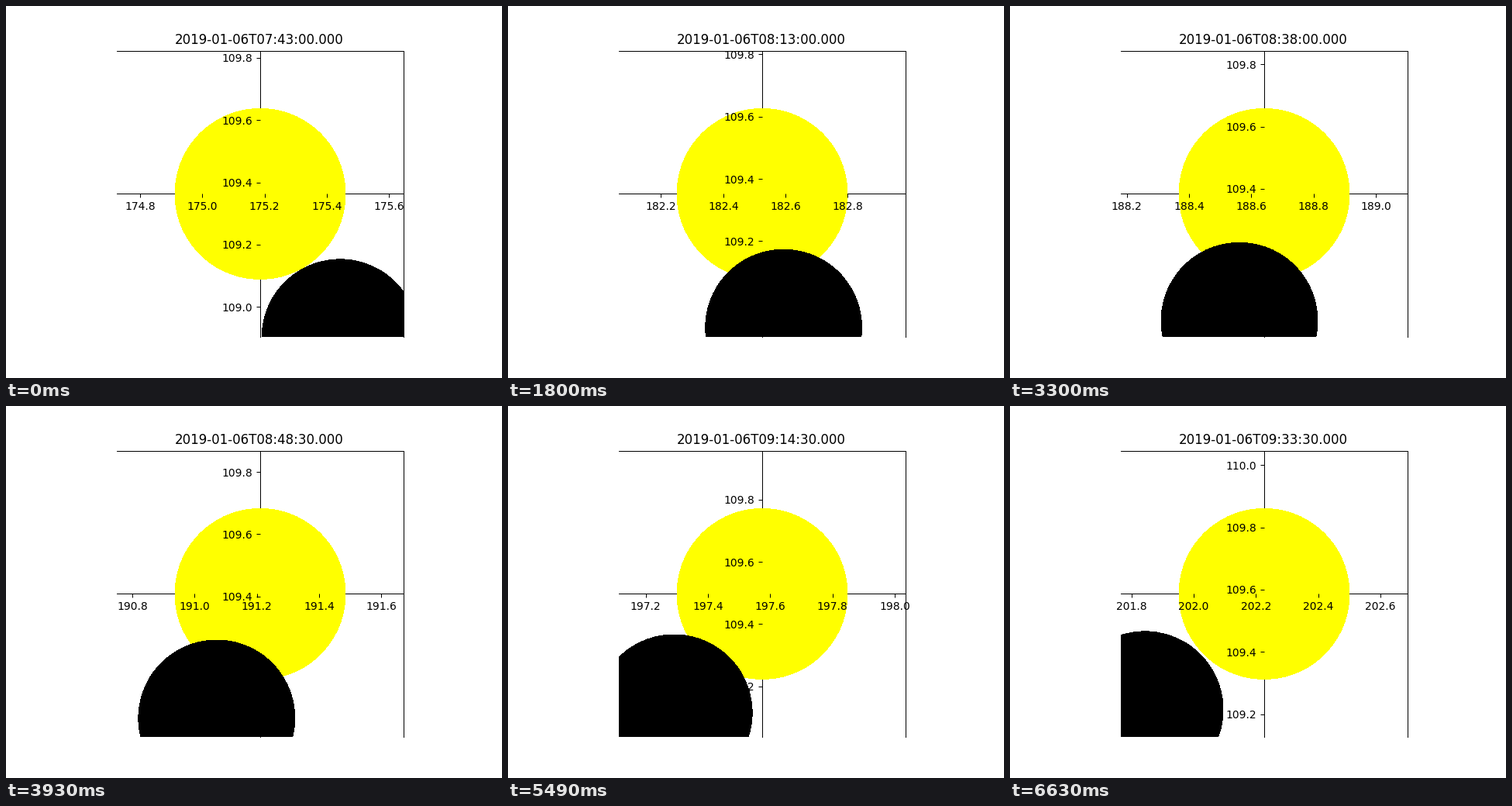
Recreate the animation shown at these times as a matplotlib script. Size 640x480 px, loop 6660 ms.

```python
import numpy as np
import matplotlib.pyplot as plt
from matplotlib.animation import FuncAnimation
from matplotlib.patches import Circle
from matplotlib.ticker import MultipleLocator

FRAMES = 222
INTERVAL = 30        # ms
STEP = 30            # simulated seconds per frame
START = 7 * 3600 + 43 * 60
HALF = 0.46          # half width of the view, degrees
NOON = 19.678        # minutes after the start
TURN = 0.24992       # hour angle, degrees per minute


def sun_position(t):
    """Azimuth and zenith distance in degrees, t in minutes."""
    h = np.radians((t - NOON) * TURN)
    azimuth = 180 + np.degrees(np.arctan2(np.sin(h), 0.99843 * np.cos(h) + 0.0232))
    zenith = 109.3514 - 9e-5 * t + 3.16 * (1 - np.cos(h))
    return azimuth, zenith


def moon_offset(t):
    """Moon's place relative to the sun, in degrees."""
    return (0.2566 - 6.436e-3 * t + 5.85e-6 * t**2,
            -0.4615 + 1.139e-3 * t - 2.97e-6 * t**2)


def clock(seconds):
    h, rest = divmod(seconds, 3600)
    m, s = divmod(rest, 60)
    return f"2019-01-06T{h:02d}:{m:02d}:{s:02d}.000"


# 0.72 pt is exactly one pixel at 100 dpi
plt.rcParams.update({
    "font.family": "DejaVu Sans",
    "axes.linewidth": 0.72,
    "xtick.major.width": 0.72,
    "ytick.major.width": 0.72,
})
fig, ax = plt.subplots(figsize=(6.4, 4.8), dpi=100)
ax.set_aspect("equal")
for spine in ax.spines.values():
    spine.set_zorder(0.5)
for side in ("left", "bottom"):
    ax.spines[side].set_position("center")
for axis in (ax.xaxis, ax.yaxis):
    axis.set_major_locator(MultipleLocator(0.2))
    axis.set_major_formatter("{x:.1f}")
    axis.set_zorder(1.5)


def disc(radius, color, zorder):
    return ax.add_patch(Circle((0, 0), radius, fc=color, lw=0,
                               antialiased=False, zorder=zorder))


sun = disc(0.2738, "yellow", 1)
moon = disc(0.2512, "black", 3)
title = ax.set_title("", x=0.4975, y=1.0)


def update(i):
    t = i * STEP / 60
    x, y = sun_position(t)
    dx, dy = moon_offset(t)
    sun.center = x, y
    moon.center = x + dx, y + dy
    ax.set_xlim(x - HALF, x + HALF)
    ax.set_ylim(y - HALF, y + HALF)
    title.set_text(clock(START + i * STEP))
    return sun, moon, title


anim = FuncAnimation(fig, update, frames=FRAMES, interval=INTERVAL,
                     repeat=True, repeat_delay=0, blit=False)
plt.show()
```
